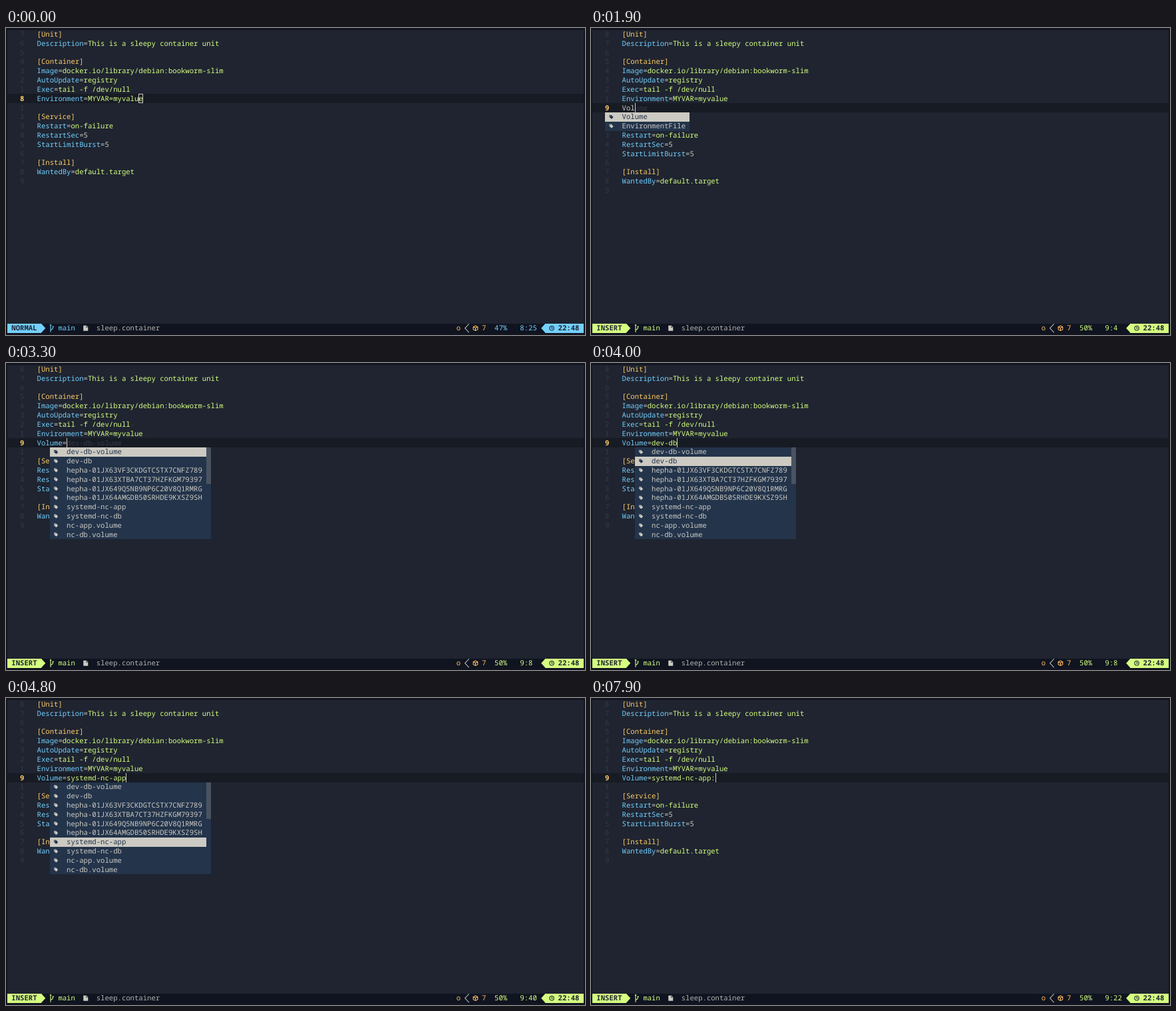
These frames come from a looping animation (870x462 px, 8000 ms). An HTML page with a canvas:

```html
<!DOCTYPE html>
<html lang="en">
<head>
<meta charset="utf-8">
<title>Editing a container unit</title>
<style>
  html, body { margin: 0; width: 100%; height: 100%; overflow: hidden; background: #12151f; }
  canvas { display: block; }
</style>
</head>
<body>
<canvas id="stage" width="870" height="462"></canvas>
<script>
const ctx = document.getElementById('stage').getContext('2d');
const LOOP = 8000;
const CELL_W = 6.366, CELL_H = 13.82, LEFT = 2, TOP = 2.6;
const TEXT_COL = 7, STATUS_ROW = 32;
const FONT = '10.61px "Noto Sans Mono", "DejaVu Sans Mono", monospace';

const C = {
  edge: '#12151f', bg: '#1f2430', line: '#171b24', bar: '#0f1420',
  fg: '#cccac2', dim: '#343a46', blue: '#73d0ff', green: '#d5ff80',
  yellow: '#ffcc66', orange: '#ffb55e', menu: '#23344b', thumb: '#4a5360'
};

const FILE = [
  '[Unit]', 'Description=This is a sleepy container unit', '',
  '[Container]', 'Image=docker.io/library/debian:bookworm-slim', 'AutoUpdate=registry',
  'Exec=tail -f /dev/null', 'Environment=MYVAR=myvalue', '',
  '[Service]', 'Restart=on-failure', 'RestartSec=5', 'StartLimitBurst=5', '',
  '[Install]', 'WantedBy=default.target', ''
];
const NEW_ROW = 8;
const TRAILING_SPACE = [1, 6];

const KEYS = { col: 3, textCol: 7, endCol: 23, items: ['Volume', 'EnvironmentFile'] };
const VOLUMES = {
  col: 10, textCol: 14, endCol: 47, scrollRows: 4,
  items: [
    'dev-db-volume', 'dev-db',
    'hepha-01JX63VF3CKDGTCSTX7CNFZ789', 'hepha-01JX63XTBA7CT37HZFKGM79397',
    'hepha-01JX649Q5NB9NP6C20V8Q1RMRG', 'hepha-01JX64AMGDB50SRHDE9KXSZ9SH',
    'systemd-nc-app', 'systemd-nc-db', 'nc-app.volume', 'nc-db.volume'
  ]
};

const pick = selected => ({ selected, ghost: '', typed: 'Volume=' + VOLUMES.items[selected] });

// Each step overrides part of the editor state from its time on.
const STEPS = [
  [0, { insert: false, typed: '', ghost: '', menu: null, selected: 0, position: '8:25' }],
  [800, { insert: true, position: '9:1' }],
  [1500, { typed: 'V', position: '9:2' }],
  [1600, { menu: KEYS, ghost: 'olume' }],
  [1700, { typed: 'Vo', ghost: 'lume', position: '9:3' }],
  [1900, { typed: 'Vol', ghost: 'ume', position: '9:4' }],
  [2100, { typed: 'Volume', ghost: '', menu: null, position: '9:7' }],
  [2800, { typed: 'Volume=' }],
  [3300, { menu: VOLUMES, ghost: 'dev-db-volume', position: '9:8' }],
  [3900, pick(1)],
  [4100, { ...pick(2), position: '9:40' }],
  [4300, pick(3)],
  [4500, pick(4)],
  [4600, pick(5)],
  [4800, pick(6)],
  [7000, { menu: null, position: '9:22' }],
  [7800, { typed: 'Volume=systemd-nc-app:' }]
];

const stateAt = t => Object.assign({}, ...STEPS.filter(([start]) => start <= t).map(s => s[1]));
const colX = col => LEFT + col * CELL_W;
const rowY = row => TOP + row * CELL_H;

function fillCells(col, row, cols, rows, color) {
  const x = Math.round(colX(col)), y = Math.round(rowY(row));
  ctx.fillStyle = color;
  ctx.fillRect(x, y, Math.round(colX(col + cols)) - x, Math.round(rowY(row + rows)) - y);
}

function write(text, col, row, color, weight = '') {
  ctx.font = `${weight} ${FONT}`;
  ctx.fillStyle = color;
  ctx.fillText(text, colX(col), rowY(row) + 10.4);
}

// Draws a path around the centre of a cell.
function icon(col, row, path, color, filled) {
  ctx.save();
  ctx.translate(colX(col + .5), rowY(row + .5));
  ctx.fillStyle = ctx.strokeStyle = color;
  ctx.lineWidth = 1.1;
  filled ? ctx.fill(new Path2D(path), 'evenodd') : ctx.stroke(new Path2D(path));
  ctx.restore();
}

function writeEntry(text, row) {
  if (text[0] === '[') return write(text, TEXT_COL, row, C.yellow);
  const split = text.indexOf('=');
  if (split < 0) return write(text, TEXT_COL, row, C.fg);
  const value = text.slice(split + 1);
  write(text.slice(0, split), TEXT_COL, row, C.blue);
  write('=', TEXT_COL + split, row, C.fg);
  write(value, TEXT_COL + split + 1, row, /^\d+$/.test(value) ? C.fg : C.green);
}

function drawBuffer({ insert, typed, ghost }) {
  const lines = [...FILE];
  if (insert) lines.splice(NEW_ROW, 0, typed);
  const current = insert ? NEW_ROW : NEW_ROW - 1;
  fillCells(0, current, 136, 1, C.line);
  lines.forEach((text, row) => {
    const here = row === current;
    write(here ? row + 1 : Math.abs(row - current), 3, row, here ? C.yellow : C.dim, here ? 'bold' : '');
    writeEntry(text, row);
    if (TRAILING_SPACE.includes(row)) write('-', TEXT_COL + text.length, row, C.dim);
  });
  if (insert) {
    const col = TEXT_COL + typed.length;
    write(ghost, col, current, C.dim);
    ctx.fillStyle = C.fg;
    ctx.fillRect(Math.round(colX(col)), Math.round(rowY(current)), 1, 14);
  } else {
    const col = TEXT_COL + lines[current].length - 1;
    ctx.strokeStyle = C.fg;
    ctx.lineWidth = 1;
    ctx.strokeRect(Math.round(colX(col)) + .5, Math.round(rowY(current)) + .5, 6, 13);
  }
}

function drawMenu({ menu, selected }) {
  if (!menu) return;
  const first = NEW_ROW + 1, cols = menu.endCol - menu.col;
  fillCells(menu.col, first, cols, menu.items.length, C.menu);
  if (menu.scrollRows) {
    fillCells(menu.endCol, first, 1, menu.items.length, C.menu);
    fillCells(menu.endCol, first, 1, menu.scrollRows, C.thumb);
  }
  menu.items.forEach((text, i) => {
    const active = i === selected, color = active ? C.menu : C.fg;
    if (active) fillCells(menu.col, first + i, cols, 1, C.fg);
    icon(menu.col + 1, first + i, 'M-3-3H0L3 .3 .3 3-3 0ZM-2-2V-1H-1V-2Z', color, true);
    write(text, menu.textCol, first + i, color);
  });
}

function arrow(fromCol, tipCol, color) {
  ctx.fillStyle = color;
  ctx.beginPath();
  ctx.moveTo(colX(fromCol), rowY(STATUS_ROW));
  ctx.lineTo(colX(tipCol), rowY(STATUS_ROW + .5));
  ctx.lineTo(colX(fromCol), rowY(STATUS_ROW + 1));
  ctx.fill();
}

function drawStatus({ insert, position }) {
  const row = STATUS_ROW, accent = insert ? C.green : C.blue;
  fillCells(0, row, 136, 1, C.bar);
  fillCells(0, row, 8, 1, accent);
  arrow(8, 9, accent);
  write(insert ? 'INSERT' : 'NORMAL', 1, row, C.bg, 'bold');
  icon(10, row, 'M-1.8-6V6M-1.8 2.5Q1.8 2 1.8-2M-3-4.5H-.6M.6-2.5H3', accent);
  write('main', 12, row, accent);
  icon(18, row, 'M-3.5-4H1L3.5-1.5V4H-3.5ZM.6-3.2V-1H2.8Z', C.fg, true);
  write('sleep.container', 21, row, '#b4b4b0');

  write('o', 106, row, C.orange);
  icon(108, row, 'M3-6.5L-3 0 3 6.5', C.fg);
  icon(110, row, 'M0-3.7L3.3-2V2L0 3.7-3.3 2V-2ZM-3.3-2L0-.3 3.3-2M0-.3V3.7', C.orange);
  write('7', 112, row, C.orange);
  write(insert ? '50%' : '47%', 115, row, accent);
  write(position, 121, row, accent);
  arrow(127, 126, accent);
  fillCells(127, row, 9, 1, accent);
  icon(128, row, 'M3.2 0A3.2 3.2 0 1 1-3.2 0A3.2 3.2 0 1 1 3.2 0M0-2V.3H1.6', C.bg);
  write('22:48', 130, row, C.bg, 'bold');
}

function draw() {
  const state = stateAt(performance.now() % LOOP);
  ctx.textRendering = 'geometricPrecision';
  ctx.fillStyle = C.edge;
  ctx.fillRect(0, 0, 870, 462);
  fillCells(0, 0, 136, STATUS_ROW, C.bg);
  drawBuffer(state);
  drawMenu(state);
  drawStatus(state);
  requestAnimationFrame(draw);
}
draw();
</script>
</body>
</html>
```
